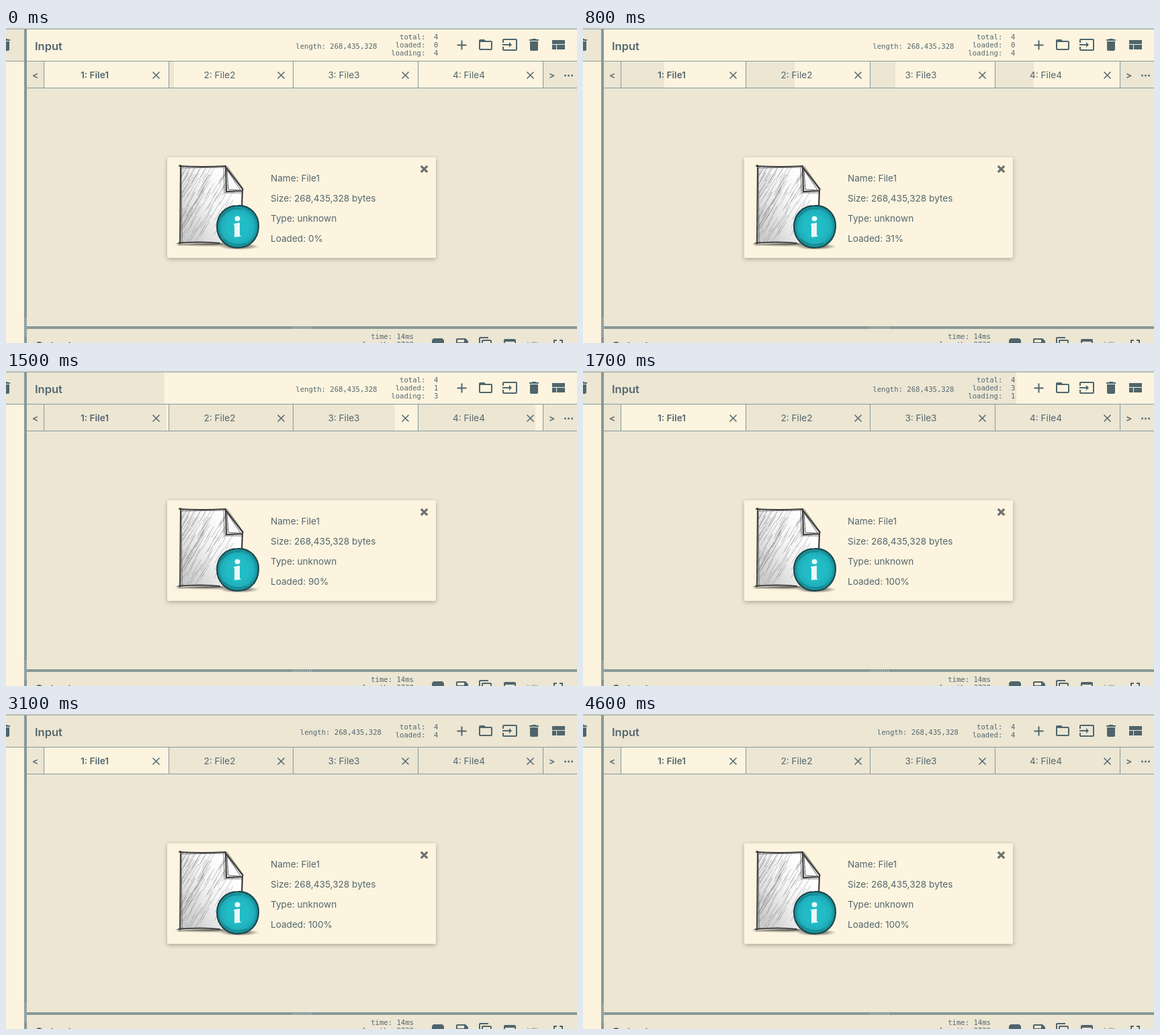
These frames come from a looping animation (850x470 px, 4700 ms). An HTML page:

```html
<!DOCTYPE html>
<html lang="en">
<head>
<meta charset="utf-8">
<title>Loading files</title>
<style>
  html, body { margin: 0; width: 100%; height: 100%; overflow: hidden; background: #ece6d3; }
  svg { display: block; width: 850px; height: 470px; }
  text { font: 13.6px Inter, sans-serif; fill: #54666d; white-space: pre; }
  .title { font-size: 16.5px; font-weight: 600; }
  .bold { font-weight: 600; }
  .mid { text-anchor: middle; }
  .mono text { font: 10.6px "DejaVu Sans Mono", monospace; text-anchor: end; }
  .light { fill: #fcf4df; }
  .dark { fill: #ece6d3; }
  .bar { fill: #87999a; }
  .icon { fill: #4f656c; }
  .dots { stroke: #d5d8cc; stroke-width: 1; stroke-dasharray: 1 2; }
  .card { filter: drop-shadow(0 2px 3px rgba(0, 0, 0, .27)); }
</style>
</head>
<body>
<svg viewBox="0 0 850 470">
  <defs>
    <linearGradient id="paper" x1="0" y1=".8" x2=".8" y2=".2">
      <stop offset="0" stop-color="#c9c9c9"/>
      <stop offset=".55" stop-color="#f3f3f3"/>
      <stop offset="1" stop-color="#fff"/>
    </linearGradient>
    <radialGradient id="ball" cx=".5" cy=".5" r=".5">
      <stop offset=".5" stop-color="#22bcc7"/>
      <stop offset=".8" stop-color="#1eafba"/>
      <stop offset="1" stop-color="#167f88"/>
    </radialGradient>
    <radialGradient id="shade">
      <stop offset="0" stop-color="#333"/>
      <stop offset="1" stop-color="#333" stop-opacity="0"/>
    </radialGradient>
    <clipPath id="page"><path d="M260 207H327L352 243V321H259Z"/></clipPath>
  </defs>

  <!-- panels -->
  <rect class="dark" width="850" height="470"/>
  <rect class="light" y="50" width="27" height="420"/>
  <rect class="light" x="31" y="2" width="819" height="47"/>
  <rect id="head" class="dark" x="31" y="2" height="47"/>
  <g id="tabs"></g>
  <g class="bar">
    <rect y="1" width="850" height="1"/>
    <rect y="49" width="850" height="1"/>
    <rect x="31" y="89" width="819" height="1"/>
    <rect x="27" y="1" width="4" height="469"/>
    <rect x="31" y="445" width="819" height="4"/>
  </g>
  <path class="dots" d="M427 446.5H457M427 448.5H457M28.5 432V462M30.5 432V462"/>

  <!-- headings and controls -->
  <text class="title" x="43" y="33">Input</text>
  <text class="title" x="43" y="480">Output</text>
  <text class="bold mid" x="43.5" y="75">&lt;</text>
  <text class="bold mid" x="812.5" y="75">&gt;</text>
  <g class="icon">
    <circle cx="832.5" cy="71" r="1.4"/><circle cx="837.5" cy="71" r="1.4"/><circle cx="842.5" cy="71" r="1.4"/>
  </g>
  <g id="icons" class="icon"></g>
  <g class="mono">
    <text id="length" y="30.5">length: 268,435,328</text>
    <g id="stats"></g>
    <text x="607" y="464">time: 14ms</text>
    <text x="607" y="476">length: 2738</text>
  </g>

  <!-- file card -->
  <rect class="light card" x="240" y="193" width="400" height="150" rx="2"/>
  <path d="M617.8 205.8L627.2 215.2M627.2 205.8L617.8 215.2" stroke="#6b706d" stroke-width="3.2"/>
  <text x="394" y="228.5">Name: File1</text>
  <text x="394" y="258.5">Size: 268,435,328 bytes</text>
  <text x="394" y="288.5">Type: unknown</text>
  <text id="loaded" x="394" y="318.5"></text>

  <!-- sketched document -->
  <ellipse cx="305" cy="322.5" rx="56" ry="4" fill="url(#shade)" opacity=".7"/>
  <ellipse cx="347" cy="326" rx="30" ry="5" fill="url(#shade)"/>
  <path d="M260 207H327L352 243V321H259Z" fill="url(#paper)"/>
  <path id="hatch" clip-path="url(#page)" fill="none" stroke="#777" stroke-width=".7" opacity=".6"/>
  <g fill="none" stroke="#3c3c3c" stroke-linecap="round">
    <path d="M258 206Q292 208 327 206M260 205L259 322M257 321Q290 318 318 321" stroke-width="2"/>
    <path d="M262 209L326 208M261 207L262 319M256 324L322 322M254 322L264 319M258 204L264 208" stroke-width=".9" opacity=".7"/>
    <path d="M326 206L352 240L351 268M327 207L328 244L352 243" stroke-width="2.2"/>
    <path d="M329 212L331 241L349 242Z" fill="#fafafa" stroke-width=".8"/>
    <path d="M324 208L325 244M325 246L351 246M329 206L354 241" stroke-width="1" opacity=".65"/>
  </g>
  <path d="M345 265C364 264 377 279 376 297C375 316 362 328 345 328C327 328 314 314 314 296C314 278 327 265 345 265Z" fill="url(#ball)" stroke="#1d4347" stroke-width="2"/>
  <path d="M321 282Q332 267 350 270M324 315Q340 328 358 321" fill="none" stroke="#126f78" stroke-width="1.5" opacity=".6"/>
  <g fill="#e9f9f8">
    <ellipse cx="344.5" cy="284.5" rx="4" ry="3.8"/>
    <path d="M339 292L348 290.5V309L350 311L340 312V295Z"/>
  </g>
</svg>

<script>
const $ = id => document.getElementById(id);
const add = (id, html) => $(id).insertAdjacentHTML('beforeend', html);

const trash = 'M6 19c0 1.1.9 2 2 2h8c1.1 0 2-.9 2-2V7H6zM19 4h-3.5l-1-1h-5l-1 1H5v2h14z';
const icon = (x, y, d, more = '') =>
  add('icons', `<path transform="translate(${x} ${y})" fill-rule="evenodd" d="${d}" ${more}/>`);

icon(-13, 13, trash);
icon(666.5, 13.5, 'M19 13h-6v6h-2v-6H5v-2h6V5h2v6h6z');
icon(702, 13, 'M20 6h-8l-2-2H4C2.9 4 2 4.9 2 6v12c0 1.1.9 2 2 2h16c1.1 0 2-.9 2-2V8c0-1.1-.9-2-2-2zM20 18H4V8h16z');
icon(738, 13, 'M21 3H3C1.9 3 1 3.9 1 5v4h2V5h18v14H3v-4H1v4c0 1.1.9 2 2 2h18c1.1 0 2-.9 2-2V5c0-1.1-.9-2-2-2zM11 16l4-4-4-4v3H1v2h10z');
icon(774, 13, trash);
icon(810, 13, 'M3 19h6v-7H3zM10 19h12v-7H10zM3 5v6h19V5z');
icon(631, 460, 'M20.5 5.2l-1.4-1.7Q18.7 3 18 3H6Q5.3 3 4.8 3.5L3.5 5.2Q3 5.8 3 6.5V19h18V6.5Q21 5.8 20.5 5.2z');
icon(667, 460, 'M17 3H5C3.9 3 3 3.9 3 5v14h18V7zM15 9H5V5h10z');
icon(702, 460, 'M16 1H4C2.9 1 2 1.9 2 3v14h2V3h12zM19 5H8C6.9 5 6 5.9 6 7v14h15V7c0-1.1-.9-2-2-2zM19 21H8V7h11z');
icon(738, 460, 'M19 4H5C3.9 4 3 4.9 3 6v12h2V8h14v10h2V6c0-1.1-.9-2-2-2z');
icon(774, 460, 'M12.5 8c-2.6 0-5 1-6.9 2.6L2 7v9h9l-3.6-3.6c1.4-1.2 3.1-1.9 5.1-1.9 3.5 0 6.5 2.3 7.6 5.5l2.4-.8C21.1 11 17.2 8 12.5 8z', 'opacity=".3"');
icon(810, 460, 'M5 10h2V7h3V5H5zM14 5v2h3v3h2V5z');

// Progress of each file: [step, percent] pairs, one step per 100 ms
const files = [
  [[0, 0], [6, 23.5], [7, 31], [8, 34.6], [11, 59], [12, 66], [14, 90], [15, 98.4], [16, 100]],
  [[0, 4], [8, 39], [12, 73.5], [15, 100]],
  [[0, 0], [8, 20], [12, 51], [15, 81.8], [17, 100]],
  [[0, 0], [8, 31], [12, 63], [15, 94], [16, 100]]
];

function progress(points, step) {
  const i = points.findIndex(p => p[0] > step);
  if (i < 0) return 100;
  if (!i) return points[0][1];
  const [a, from] = points[i - 1], [b, to] = points[i];
  return from + (to - from) * (step - a) / (b - a);
}

const tabX = i => 57 + Math.round(i * 185.7);
files.forEach((_, i) => {
  const x = tabX(i), w = tabX(i + 1) - x - 1, c = x + 166.5;
  add('tabs', `<rect class="light" x="${x}" y="50" width="${w}" height="39"/>
    <rect id="fill${i}" class="dark" x="${x}" y="50" height="39"/>
    <rect class="bar" x="${x - 1}" y="50" width="1" height="39"/>
    <text class="mid${i ? '' : ' bold'}" x="${x + 75}" y="75">${i + 1}: File${i + 1}</text>
    <path d="M${c - 5} 65.5l10 10m0 -10l-10 10" stroke="#54666d" stroke-width="1.5"/>`);
});
add('tabs', '<rect class="bar" x="799" y="50" width="1" height="39"/>');

// Pencil shading, denser towards the lower left
let seed = 7;
const rnd = () => (seed = seed * 16807 % 2147483647) / 2147483647;
let strokes = '';
for (let i = 0; i < 120; i++) {
  const x = 256 + 75 * rnd() ** 1.6, y = 322 - 105 * rnd(), l = 8 + 22 * rnd();
  strokes += `M${x.toFixed(1)} ${y.toFixed(1)}l${(l * .6).toFixed(1)} ${(-l).toFixed(1)}`;
}
$('hatch').setAttribute('d', strokes);

function draw(step) {
  const done = files.map(f => progress(f, step));
  done.forEach((p, i) => {
    const w = tabX(i + 1) - tabX(i) - 1;
    $('fill' + i).setAttribute('width', !i && p === 100 ? 0 : Math.round(w * p / 100));
  });
  const shown = step < 16 ? Math.round(progress(files[0], Math.max(0, step - 1))) : 100;
  $('loaded').textContent = `Loaded: ${shown}%`;

  // The header count lags behind the last file
  const ready = step >= 20 ? 4 : Math.min(3, done.filter(p => p === 100).length);
  $('head').setAttribute('width', 819 * ready / 4);
  const rows = ['total:  4', `loaded:  ${ready}`];
  if (ready < 4) rows.push(`loading:  ${4 - ready}`);
  const top = ready < 4 ? 17 : 23;
  $('stats').innerHTML = rows.map((r, i) => `<text x="643.5" y="${top + 12 * i}">${r}</text>`).join('');
  $('length').setAttribute('x', ready < 4 ? 552.5 : 559);
}

let last = -1;
const start = performance.now();
function tick() {
  const step = Math.floor((performance.now() - start) % 4700 / 100);
  if (step !== last) draw(last = step);
  requestAnimationFrame(tick);
}
tick();
</script>
</body>
</html>
```
